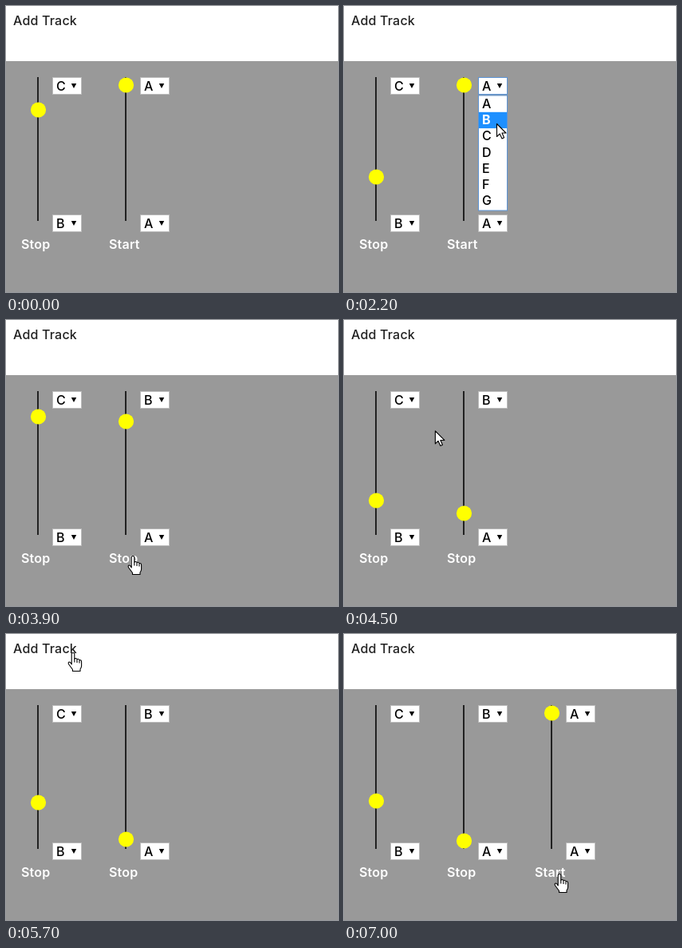
An HTML page for the animation above (7100 ms loop, 416x358 px).

```html
<!DOCTYPE html>
<html lang="en">
<head>
<meta charset="utf-8">
<title>Track sliders</title>
<style>
html, body { margin: 0; width: 100%; height: 100%; overflow: hidden; background: #999; }
svg { display: block; width: 416px; height: 358px; }
text { font: 500 16px Inter, "Open Sans", sans-serif; fill: #000; }
.title { fill: #222; letter-spacing: .2px; }
.label { fill: #fff; font-weight: 600; letter-spacing: .2px; }
.picked { fill: #fff; font-weight: 700; }
</style>
</head>
<body>
<svg id="stage" viewBox="0 0 416 358"></svg>
<script>
const LOOP = 7100, STEP = 100;
const TOP = 99, TRAVEL = 160;
const OPEN = 1600, PICK = 2500, START = 3800, ADD = 5800;
const ROW = 20.3, LIST_TOP = 112.5;
const LETTERS = [..."ABCDEFG"];

// Distance covered by the first ball, counted along its up-and-down path
const RUN = [[0, 289], [1300, 621], [2200, 845], [3900, 1258],
  [5100, 1556], [5700, 1712], [7000, 2030], [7100, 2055]];
const LEAD = 1230;

// Pointer tip: time, x, y
const PATH = [[500, 352, 314], [800, 244, 270], [1200, 186, 108], [1300, 184, 100],
  [1700, 184, 101], [2200, 191, 147], [2500, 191, 148], [3200, 166, 282],
  [3600, 159, 295], [4100, 159, 295], [4800, 80, 21], [5100, 77, 28],
  [5500, 84, 23], [5900, 84, 23], [6400, 226, 196], [6800, 270, 300], [7100, 270, 300]];

const stage = document.getElementById("stage");

function add(parent, tag, attrs, text) {
  const node = document.createElementNS("http://www.w3.org/2000/svg", tag);
  for (const key in attrs) node.setAttribute(key, attrs[key]);
  if (text) node.textContent = text;
  parent.append(node);
  return node;
}

function show(node, on) {
  node.setAttribute("display", on ? "inline" : "none");
}

function along(keys, t, col) {
  let i = 1;
  while (i < keys.length - 1 && t > keys[i][0]) i++;
  const a = keys[i - 1], b = keys[i];
  const k = Math.min(1, Math.max(0, (t - a[0]) / (b[0] - a[0])));
  return a[col] + (b[col] - a[col]) * k;
}

function bounce(dist) {
  const d = dist % (2 * TRAVEL);
  return TOP + (d > TRAVEL ? 2 * TRAVEL - d : d);
}

function addSelect(parent, y, letter) {
  const box = add(parent, "rect", { x: 58.5, y: y + .5, width: 36, height: 21, fill: "#fff", stroke: "#bbb" });
  const text = add(parent, "text", { x: 63, y: y + 17 }, letter);
  add(parent, "path", { d: `M81.8 ${y + 8}h6.4l-3.2 6z` });
  return { box, text };
}

function addTrack(x, high, low, label) {
  const g = add(stage, "g", { transform: `translate(${x} 0)` });
  add(g, "rect", { x: 39, y: 89, width: 2, height: 180, fill: "#222" });
  const ball = add(g, "circle", { cx: 40.5, cy: TOP, r: 9.6, fill: "#ff0" });
  const select = addSelect(g, 89, high);
  addSelect(g, 261, low);
  const name = add(g, "text", { x: 19, y: 304, class: "label" }, label);
  return { g, ball, select, name };
}

add(stage, "rect", { width: 416, height: 358, fill: "#999" });
add(stage, "rect", { width: 416, height: 69, fill: "#fff" });
add(stage, "text", { x: 9, y: 24, class: "title" }, "Add Track");

const first = addTrack(0, "C", "B", "Stop");
const second = addTrack(110, "A", "A", "Start");
const third = addTrack(220, "A", "A", "Start");

const list = add(stage, "g", {});
add(list, "rect", { x: 168.5, y: LIST_TOP - .5, width: 36, height: 144, fill: "#fff", stroke: "#5b94d6" });
const bar = add(list, "rect", { x: 169, width: 35, height: ROW, fill: "#1e90ff" });
const items = LETTERS.map((c, i) => add(list, "text", { x: 173, y: 128 + i * 20.2 }, c));

const ink = { fill: "#fff", stroke: "#000", "stroke-width": 1.1, "stroke-linejoin": "round" };
const arrow = add(stage, "path", { d: "M.5 .5V16.5L4.2 13L7 19L9.6 17.8L7 12H12Z", ...ink });
const hand = add(stage, "g", {});
add(hand, "path", {
  d: "M-1.8 15V2Q-1.8 .5 0 .5T1.8 2V8Q3.5 6.7 5 8.5Q6.8 7.7 8 9.5Q10.6 9 10.6 12V17Q10.6 19 9 21V23.5H-.5V21.5L-5.3 15Q-6.6 12.6-4.8 12Q-3.4 11.7-1.8 15Z",
  ...ink
});
add(hand, "path", { d: "M1.8 8V12.5M5 9V13M8 10V13.5", ...ink, fill: "none" });

function inside(x, y, left, top, right, bottom) {
  return x >= left && x <= right && y >= top && y <= bottom;
}

function draw(t) {
  const dist = along(RUN, t, 1);
  const x = along(PATH, t, 1), y = along(PATH, t, 2);
  first.ball.setAttribute("cy", bounce(dist));
  second.ball.setAttribute("cy", bounce(t < START ? 0 : Math.max(0, dist - LEAD)));
  second.name.textContent = t < START ? "Start" : "Stop";
  second.select.text.textContent = t < PICK ? "A" : "B";
  show(third.g, t >= ADD);

  const open = t >= OPEN && t < PICK;
  const hover = inside(x, y, 168, 89, 205, 111);
  second.select.box.setAttribute("stroke", open ? "#5b94d6" : hover ? "#777" : "#bbb");
  show(list, open);
  const row = Math.max(0, Math.min(6, Math.floor((y - LIST_TOP) / ROW)));
  bar.setAttribute("y", LIST_TOP + row * ROW);
  items.forEach((item, i) => item.setAttribute("class", i === row ? "picked" : ""));

  const link = inside(x, y, 9, 10, 91, 27) || inside(x, y, 129, 290, 168, 308) ||
    (t >= ADD && inside(x, y, 239, 290, 278, 308));
  const seen = t >= PATH[0][0];
  show(arrow, seen && !link);
  show(hand, seen && link);
  for (const node of [arrow, hand]) node.setAttribute("transform", `translate(${x} ${y})`);
}

function tick() {
  const t = performance.now() % LOOP;
  draw(Math.floor(t / STEP) * STEP);
  requestAnimationFrame(tick);
}
tick();
</script>
</body>
</html>
```
